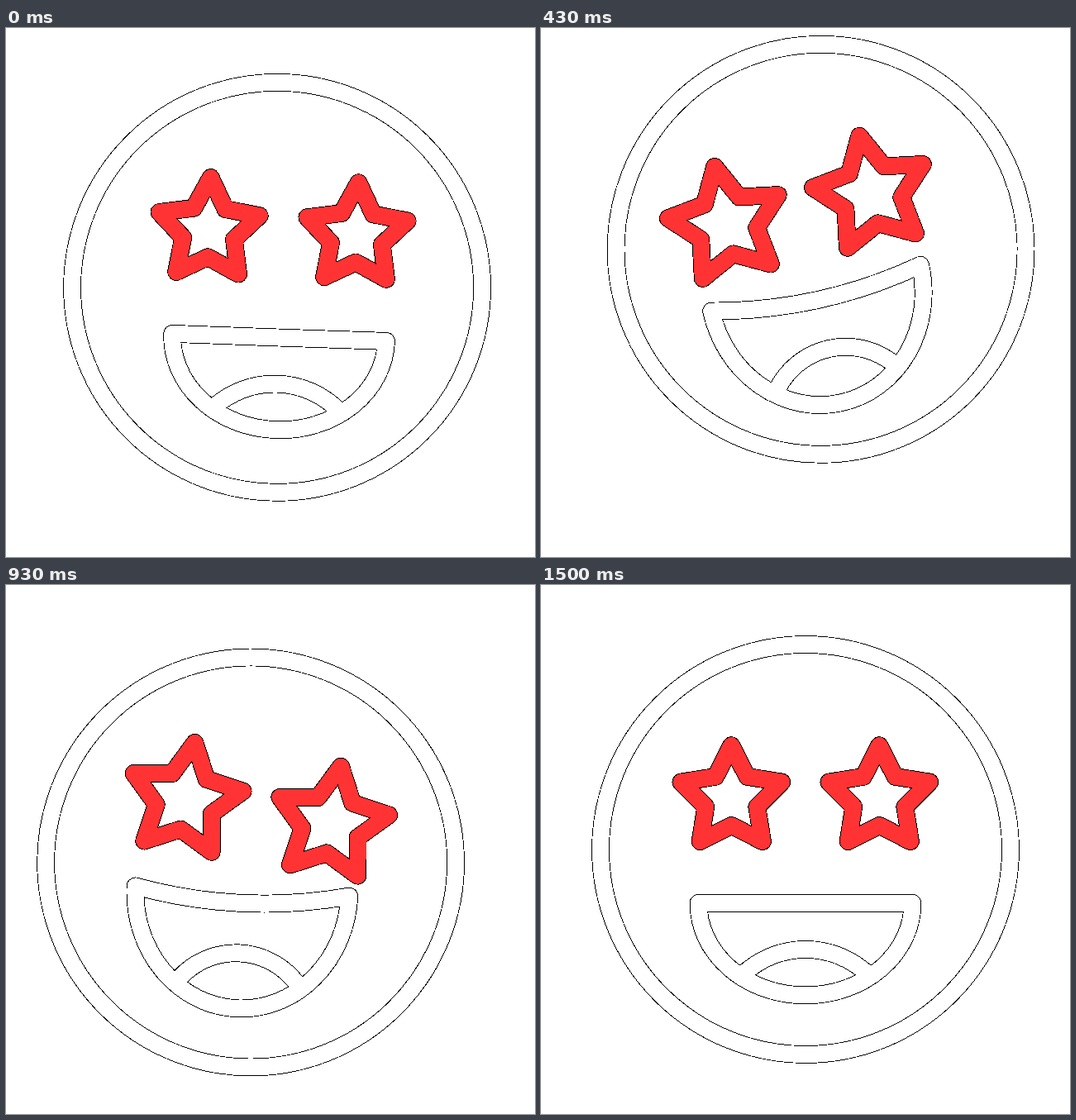
Write an HTML page that moves like this. It is 640 px wide and 640 px high and loops after 1.67 s.

```html
<!DOCTYPE html>
<html lang="en">
<head>
<meta charset="utf-8">
<title>Star-struck face</title>
<style>
  html, body { margin: 0; width: 100%; height: 100%; overflow: hidden; background: #fff; }
  svg { display: block; width: 100%; height: 100%; }
  .edge { stroke: #000; stroke-width: 21.8; }
  .white { stroke: #fff; stroke-width: 20; }
  .red { stroke: #f33; stroke-width: 20; }
</style>
</head>
<body>
<svg viewBox="0 0 640 640" fill="none" stroke-linejoin="round" shape-rendering="crispEdges">
  <defs>
    <path id="lips"/>
    <path id="tongue"/>
    <path id="star"/>
    <clipPath id="inside"><use href="#lips"/></clipPath>
  </defs>
  <g id="head">
    <circle class="edge" r="248"/>
    <circle class="white" r="248"/>
  </g>
  <g id="face">
    <g id="mouth">
      <use class="edge" href="#tongue" clip-path="url(#inside)"/>
      <use class="edge" href="#lips"/>
      <use class="white" href="#tongue" clip-path="url(#inside)"/>
      <use class="white" href="#lips"/>
    </g>
    <g transform="translate(-89.7 -61.7)">
      <use class="edge" href="#star"/>
      <use class="red" href="#star"/>
    </g>
    <g transform="translate(89.3 -61.7)">
      <use class="edge" href="#star"/>
      <use class="red" href="#star"/>
    </g>
  </g>
</svg>
<script>
const LOOP = 1670;
const { PI, sin, cos, min, max } = Math;
const $ = id => document.getElementById(id);
const place = (id, transform) => $(id).setAttribute("transform", transform);
const shape = (id, d) => $(id).setAttribute("d", d);

const clamp = (v, lo, hi) => min(max(v, lo), hi);
const ease = (t, from, to) => (1 - cos(PI * clamp((t - from) / (to - from), 0, 1))) / 2;
const pulses = (t, from, period, count) =>
  sin(PI * clamp((t - from) / period, 0, count)) ** 2;

// Waypoints of the head's loop: time, x, y.
const route = [
  [0, 328, 314], [300, 355.5, 269], [380, 357, 262.5], [570, 282, 290],
  [767, 268, 328], [930, 296, 335.5], [1130, 319, 320.5], [1200, 320, 320]
];

// Position on a smooth curve through the waypoints.
function along(t, axis) {
  const end = route.length - 1;
  if (t >= route[end][0]) return route[end][axis];
  const i = route.findIndex(p => p[0] > t) - 1;
  const slope = k => {
    if (k === end) return 0;
    const a = route[max(k - 1, 0)], b = route[k + 1];
    return (b[axis] - a[axis]) / (b[0] - a[0]);
  };
  const [a, b] = [route[i], route[i + 1]];
  const h = b[0] - a[0], u = (t - a[0]) / h, v = 1 - u;
  return v * v * (1 + 2 * u) * a[axis] + u * u * (1 + 2 * v) * b[axis]
    + h * u * v * (v * slope(i) - u * slope(i + 1));
}

// The face swings ahead of the head, then falls back into place.
function lead(t) {
  const out = ease(t, -110, 230), back = ease(t, 250, 540);
  return [
    20 * out - 48 * back + 28 * ease(t, 580, 960),
    -18 * out + 43 * back - 25 * ease(t, 540, 900)
  ];
}

const tilt = t => 14.5 * (t < 1176 ? sin(PI * (t + 14) / 340) : ease(t, 1176, 1500) - 1);
const smile = t => ease(t, -20, 280) - ease(t, 1000, 1220);

function starPath(size) {
  const points = Array.from({ length: 10 }, (_, i) => {
    const r = size * (i % 2 ? 32.5 : 63.8), a = i * PI / 5;
    return `${r * sin(a)} ${-r * cos(a)}`;
  });
  return `M${points.join("L")}Z`;
}

function draw(t) {
  const x = along(t, 1), y = along(t, 2), [dx, dy] = lead(t);
  place("head", `translate(${x} ${y})`);
  place("face", `translate(${x + dx} ${y + dy}) rotate(${tilt(t)})`);

  const lift = 29 * smile(t - 35), turn = -6.6 * pulses(t, 400, 360, 2);
  place("mouth", `translate(0 ${64.9 - lift}) rotate(${turn} 0 35)`);

  const s = smile(t), r = 110 - 17.5 * s, base = 56 + 19 * s + r;
  shape("lips", `M-129.5 0Q0 ${29 * s} 129.5 0A129.5 ${111.5 + 30.5 * s} 0 0 1 -129.5 0Z`);
  shape("tongue", `M${-r} ${base}A${r} ${r} 0 0 1 ${r} ${base}`);
  shape("star", starPath(1 + 0.29 * pulses(t, 50, 490, 3)));
}

const start = performance.now();
function tick() {
  draw((performance.now() - start) % LOOP);
  requestAnimationFrame(tick);
}
tick();
</script>
</body>
</html>
```
